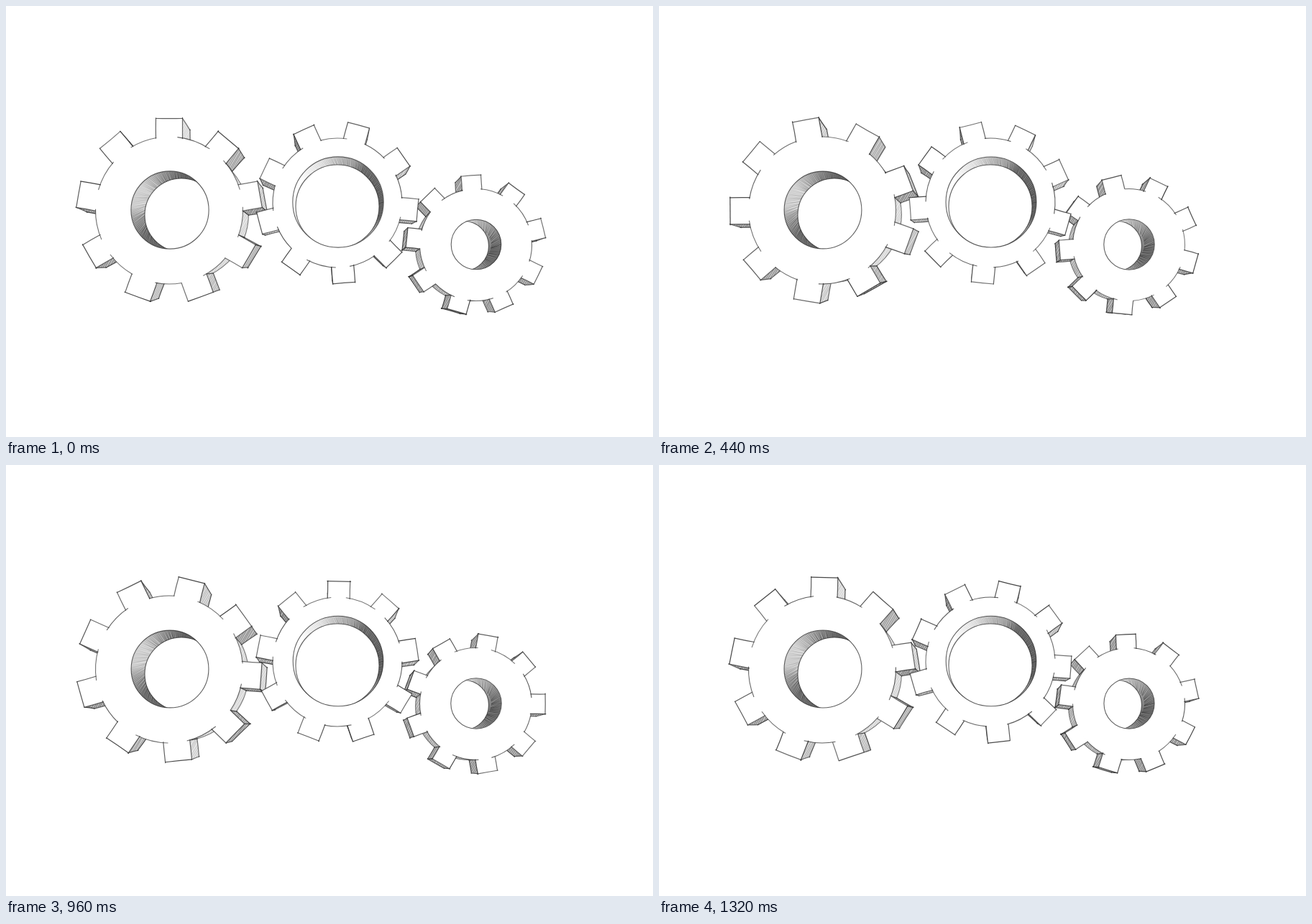
Recreate the animation shown at these times as an HTML page with a canvas. Size 900 by 600 pixels, loop 1.36 s.

```html
<!DOCTYPE html>
<html lang="en">
<head>
<meta charset="utf-8">
<title>Pencil gears</title>
<style>
html, body { margin: 0; height: 100%; overflow: hidden; background: #fff; }
canvas { display: block; }
</style>
</head>
<body>
<canvas id="stage" width="900" height="600"></canvas>
<script>
const ctx = document.getElementById('stage').getContext('2d');
const LOOP = 1360, STEP = 40, TEETH = 9;
const PITCH = 2 * Math.PI / TEETH, RAD = Math.PI / 180;

// back: offset and scale of the rear face; shade: [degrees from top, darkness] inside the hole
const gears = [
  { x: 227, y: 284.5, r: 102.5, tip: 128, width: 37, start: 0, dir: -1,
    back: [11, 6, .97, .92], rim: .22, tone: (nx, ny) => .2 + .5 * Math.abs(ny),
    hole: [228, 284, 54], inner: [244, 291, 51],
    shade: [[0, .7], [25, .95], [45, .85], [60, 0], [180, 0], [188, .9], [225, .85], [255, .55], [275, .25], [310, .22], [335, .45], [360, .7]] },
  { x: 653.5, y: 332.5, r: 78, tip: 96.5, width: 27.5, start: -4, dir: -1,
    back: [-9, 4, .96, .95], rim: .5, tone: () => .65,
    hole: [654, 332, 35], inner: [637, 334, 34.5],
    shade: [[0, .35], [35, .5], [65, .75], [110, .9], [150, .85], [175, .6], [200, 0], [325, 0], [360, .35]] },
  { x: 461, y: 274, r: 90, tip: 112, width: 31, start: -24.7, dir: 1,
    back: [-1, 6, .95, .9], rim: .3, tone: nx => .55 - .3 * nx,
    hole: [462, 273, 63], inner: [461, 279, 58],
    shade: [[0, .35], [22, .5], [38, .85], [70, .95], [110, .95], [130, .4], [150, 0], [300, 0], [335, .15], [360, .35]] }
];

let seed = 1;
function random() {
  seed = (seed * 16807) % 2147483647;
  return seed / 2147483647;
}
const jitter = amount => (random() - .5) * amount;
const ink = alpha => `rgba(45,45,45,${alpha})`;

function pencil(path, alpha = .75, width = 1.1) {
  ctx.strokeStyle = ink(alpha);
  ctx.lineWidth = width;
  ctx.stroke(path);
}

function line(a, b) {
  const dx = b[0] - a[0], dy = b[1] - a[1], len = Math.hypot(dx, dy) || 1;
  const over = 1.5 * random(), path = new Path2D();
  path.moveTo(a[0] - dx / len * over, a[1] - dy / len * over);
  path.quadraticCurveTo((a[0] + b[0]) / 2 + jitter(1), (a[1] + b[1]) / 2 + jitter(1),
    b[0] + dx / len * over, b[1] + dy / len * over);
  pencil(path, .65 + .25 * random(), 1.2);
}

function arc(x, y, r, from = 0, to = 2 * Math.PI) {
  const path = new Path2D();
  path.arc(x, y, r, from, to);
  return path;
}

function polygon(points) {
  const path = new Path2D();
  points.forEach(p => path.lineTo(...p));
  path.closePath();
  return path;
}

// Fill a shape with slanted pencil strokes
function hatch(shape, tone, [x, y, w, h]) {
  const lean = h * .6, strokes = new Path2D();
  ctx.fillStyle = '#fff';
  ctx.fill(shape);
  ctx.fillStyle = ink(tone * .5);
  ctx.fill(shape);
  for (let i = x - lean; i < x + w; i += 2.2 + random()) {
    strokes.moveTo(i, y + h);
    strokes.lineTo(i + lean + jitter(2), y);
  }
  ctx.save();
  ctx.clip(shape);
  pencil(strokes, tone * .85, .8);
  ctx.restore();
}

function bounds(points) {
  const xs = points.map(p => p[0]), ys = points.map(p => p[1]);
  const x = Math.min(...xs), y = Math.min(...ys);
  return [x, y, Math.max(...xs) - x, Math.max(...ys) - y];
}

function tooth(g, angle) {
  const c = Math.cos(angle), s = Math.sin(angle), half = g.width / 2;
  const foot = Math.sqrt(g.r * g.r - half * half);
  return [[-half, foot], [-half, g.tip], [half, g.tip], [half, foot]]
    .map(([u, v]) => [g.x + u * c + v * s, g.y + u * s - v * c]);
}

function rear(g, [x, y]) {
  const [ox, oy, sx, sy] = g.back;
  return [g.x + ox + (x - g.x) * sx, g.y + oy + (y - g.y) * sy];
}

function drawSides(g, corners) {
  for (let i = 0; i < 3; i++) {
    const a = corners[i], b = corners[i + 1], a2 = rear(g, a), b2 = rear(g, b);
    const len = Math.hypot(b[0] - a[0], b[1] - a[1]);
    const nx = (b[1] - a[1]) / len, ny = (a[0] - b[0]) / len;
    const depth = (a2[0] + b2[0] - a[0] - b[0]) * nx + (a2[1] + b2[1] - a[1] - b[1]) * ny;
    if (depth <= 0) continue;
    const face = [a, b, b2, a2];
    hatch(polygon(face), g.tone(nx, ny), bounds(face));
    line(a2, b2);
    line(a, a2);
    line(b, b2);
  }
}

function drawHole(g) {
  const [x, y, r] = g.hole, inner = arc(...g.inner);
  const shade = ctx.createConicGradient(-Math.PI / 2, x, y);
  g.shade.forEach(([deg, dark]) => shade.addColorStop(deg / 360, ink(dark)));
  const strokes = new Path2D();
  for (let a = 0; a < 2 * Math.PI; a += 2.3 / r) {
    const b = a + .22 + jitter(.12);
    strokes.moveTo(x + r * Math.cos(a), y + r * Math.sin(a));
    strokes.lineTo(x + r * .6 * Math.cos(b), y + r * .6 * Math.sin(b));
  }
  ctx.save();
  ctx.clip(arc(x, y, r));
  ctx.globalAlpha = .7;
  ctx.fillStyle = ctx.strokeStyle = shade;
  ctx.fillRect(x - r, y - r, 2 * r, 2 * r);
  ctx.lineWidth = .9;
  ctx.stroke(strokes);
  ctx.globalAlpha = 1;
  ctx.fillStyle = '#fff';
  ctx.fill(inner);
  pencil(inner);
  ctx.restore();
  pencil(arc(x, y, r + jitter(.6)));
}

function drawGear(g, turn) {
  const base = g.start * RAD + g.dir * turn;
  const angles = Array.from({ length: TEETH }, (_, i) => base + i * PITCH);
  const teeth = angles.map(a => tooth(g, a));
  const [ox, oy, sx, sy] = g.back;

  const rim = new Path2D();
  rim.ellipse(g.x + ox, g.y + oy, g.r * sx, g.r * sy, 0, 0, 2 * Math.PI);
  hatch(rim, g.rim, [g.x - g.r * 1.2, g.y - g.r * 1.2, g.r * 2.4, g.r * 2.4]);
  pencil(rim, .6);
  teeth.forEach(t => drawSides(g, t));

  ctx.fillStyle = '#fff';
  ctx.fill(arc(g.x, g.y, g.r));
  teeth.forEach(t => ctx.fill(polygon(t)));

  const half = Math.asin(g.width / 2 / g.r);
  teeth.forEach((t, i) => {
    for (let k = 0; k < 3; k++) line(t[k], t[k + 1]);
    const from = angles[i] - Math.PI / 2 + half;
    const to = from + PITCH - 2 * half;
    pencil(arc(g.x, g.y, g.r, from - .08 * random(), to + .08 * random()), .6 + .2 * random());
  });
  drawHole(g);
}

function draw() {
  const step = Math.floor(performance.now() % LOOP / STEP);
  const p = step * STEP / LOOP;
  const turn = PITCH * p - 3 * RAD * Math.sin(Math.PI * p);
  seed = 4001 + step * 7919;
  ctx.fillStyle = '#fff';
  ctx.fillRect(0, 0, 900, 600);
  gears.forEach(g => drawGear(g, turn));
  requestAnimationFrame(draw);
}
draw();
</script>
</body>
</html>
```
